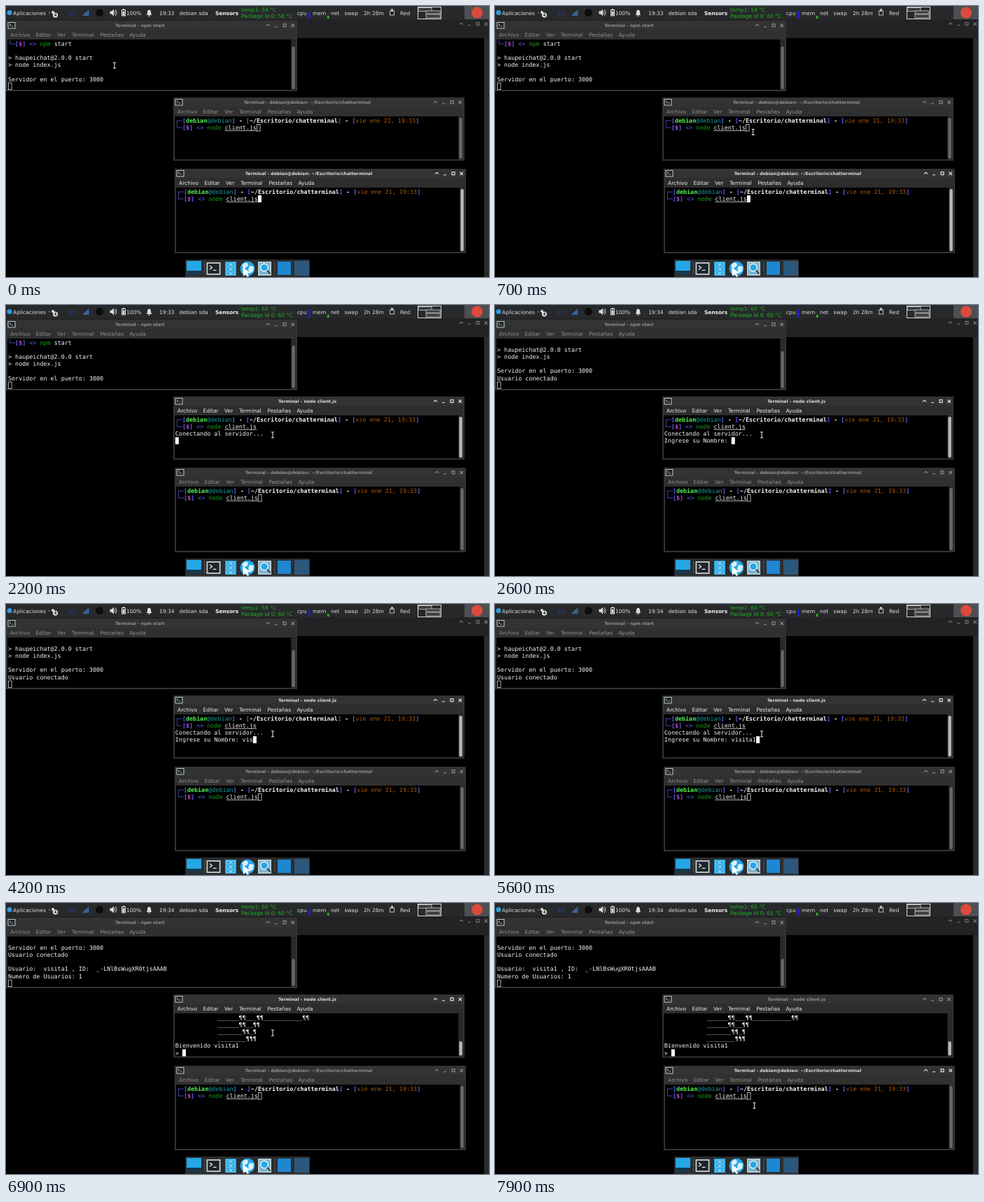
An HTML page with a canvas that plays this animation: 690 px wide and 388 px high, repeating every 8 s.

```html
<!DOCTYPE html>
<html lang="es">
<head>
<meta charset="utf-8">
<title>Chat en terminal</title>
<style>
  html, body { margin: 0; width: 100%; height: 100%; overflow: hidden; background: #000; }
  canvas { display: block; }
</style>
</head>
<body>
<canvas id="stage" width="690" height="388"></canvas>
<script>
const ctx = document.getElementById('stage').getContext('2d');
ctx.textRendering = 'geometricPrecision';

const LOOP = 8000, CELL = 5.05, LINE = 10.1;
const SANS = '"DejaVu Sans", sans-serif', MONO = '"DejaVu Sans Mono", monospace';
const USER = 'visita1';
const WHITE = '#f4f4f4', BLUE = '#6060ff', GREEN = '#18a018', DIM = '#909090';
const PANEL = '#27292b', SKY = '#24a7e6';

// ---- drawing helpers ----
function rect(x, y, w, h, color) {
  ctx.fillStyle = color;
  ctx.fillRect(x, y, w, h);
}
function frame(x, y, w, h, color, width = 1) {
  ctx.strokeStyle = color;
  ctx.lineWidth = width;
  ctx.strokeRect(x, y, w, h);
}
function disc(x, y, r, color) {
  ctx.fillStyle = color;
  ctx.beginPath();
  ctx.arc(x, y, r, 0, 7);
  ctx.fill();
}
function path(d, color, width = 1) {
  ctx.strokeStyle = color;
  ctx.lineWidth = width;
  ctx.stroke(new Path2D(d));
}
function shape(d, color) {
  ctx.fillStyle = color;
  ctx.fill(new Path2D(d));
}
function text(str, x, y, color, size = 7.5, weight = '', align = 'left') {
  ctx.font = `${weight} ${size}px ${SANS}`;
  ctx.textAlign = align;
  ctx.fillStyle = color;
  ctx.fillText(str, x, y);
}

// ---- time helpers ----
// Value of the last [time, value] step already reached.
const step = (t, steps) => steps.filter(s => s[0] <= t).pop()[1];

// Eased position along [time, x, y] keys.
function along(t, keys) {
  const i = keys.findIndex(k => k[0] > t);
  if (i < 0) return keys.at(-1).slice(1);
  if (i === 0) return keys[0].slice(1);
  const [t0, x0, y0] = keys[i - 1], [t1, x1, y1] = keys[i];
  const p = (t - t0) / (t1 - t0), e = p * p * (3 - 2 * p);
  return [x0 + (x1 - x0) * e, y0 + (y1 - y0) * e];
}

// ---- terminal text: a line is a string or a list of [text, color, style] ----
const PROMPT = [
  ['┌─[', BLUE, 'bold'], ['debian', '#55f055', 'bold'], ['@debian', '#1f9c9c'],
  [']', BLUE, 'bold'], [' - ', WHITE, 'bold'], ['[', BLUE, 'bold'],
  ['~/Escritorio/chatterminal', WHITE, 'bold'], [']', BLUE, 'bold'], [' - ', WHITE, 'bold'],
  ['[', BLUE, 'bold'], ['vie ene 21, 19:33', '#a6560f'], [']', BLUE, 'bold']
];
const command = (name, arg, style) => [
  ['└─[', BLUE, 'bold'], ['$', '#c545c5', 'bold'], [']', BLUE, 'bold'],
  [' <> ', BLUE], [name, GREEN], [' ', WHITE], [arg, WHITE, style]
];
const RUN_CLIENT = command('node', 'client.js', 'underline');

// Draws the lines and returns the column after the last one.
function termLines(lines, x, baseline) {
  let col = 0;
  ctx.textAlign = 'left';
  lines.forEach((line, row) => {
    col = 0;
    const y = baseline + row * LINE;
    for (const [str, color, style] of typeof line === 'string' ? [[line, WHITE]] : line) {
      const left = x + col * CELL;
      ctx.font = `${style === 'bold' ? 'bold' : ''} 8.39px ${MONO}`;
      ctx.fillStyle = color;
      ctx.fillText(str, left, y);
      if (style === 'underline') rect(left, y + 1.2, str.length * CELL, .7, color);
      col += str.length;
    }
  });
  return col;
}

function terminalIcon(x, y, w, h) {
  rect(x, y, w, h, '#c9cdcf');
  rect(x + w * .09, y + h * .1, w * .82, h * .8, '#1d2529');
  path(`M${x + w * .22} ${y + h * .27}l${w * .18} ${h * .15}l${-w * .18} ${h * .15}m${w * .24} ${h * .06}h${w * .24}`, '#eee', w / 16);
}

function controls(x, y, color) {
  path(`M${x - 2.5} ${y + 1}l2.5 -2.5l2.5 2.5 M${x + 9.5} ${y + 2}h4 M${x + 33} ${y - 2}l4.5 4.5m0 -4.5l-4.5 4.5`, color, 1.1);
  frame(x + 21.5, y - 2, 4, 4, color, 1.1);
}

function windowBox({ x, y, h, title, lines, textX, titleOn, bodyOn, thumbOn, thumbTop }) {
  const w = 416;
  rect(x, y, w, h, '#333333');
  terminalIcon(x + 2.5, y + 2, 11, 9.5);
  text(title, x + w / 2 - 16.5, y + 9, titleOn ? '#dcdcdc' : DIM, 6.15, 'bold', 'center');
  controls(x + 374.5, y + 6.7, titleOn ? '#f0f0f0' : DIM);

  rect(x + 2, y + 13.5, w - 4, 13.5, bodyOn ? '#2d2d2d' : '#303030');
  const items = [['Archivo', 6], ['Editar', 42.5], ['Ver', 73], ['Terminal', 94], ['Pestañas', 134.5], ['Ayuda', 176.5]];
  for (const [label, dx] of items) text(label, x + dx, y + 23, bodyOn ? '#eeeeee' : DIM);

  rect(x + 2, y + 27, 405.5, h - 29, '#000');
  rect(x + 407.5, y + 27, 6.5, h - 29, '#292929');
  ctx.fillStyle = thumbOn ? '#b9b9b9' : '#686868';
  ctx.beginPath();
  ctx.roundRect(x + 408.4, thumbTop, 4.4, y + h - 3 - thumbTop, 2);
  ctx.fill();

  const base = y + 36;
  const cursorX = textX + termLines(lines, textX, base) * CELL;
  const cursorY = base + (lines.length - 1) * LINE - 8;
  if (bodyOn) rect(cursorX, cursorY, 5, 10, '#fff');
  else frame(cursorX + .5, cursorY + .5, 4.6, 9.5, '#d8d8d8', .8);
}

// ---- panel, dock and backdrop ----
function backdrop() {
  rect(0, 0, 690, 388, '#000');
  rect(0, 19, 690, 27, '#232325');
  controls(650.5, 25.5, '#77777c');
  rect(683, 46, 7, 342, '#2a2a2b');
}

function panel(t) {
  const ink = '#dedede', green = '#1fb51f';
  rect(0, 0, 690, 19, PANEL);
  disc(5, 9.5, 3.5, '#2a9fe0');
  text('Aplicaciones', 10, 12.5, ink);
  rect(61, 9, 1.5, 1.5, '#999');
  disc(67, 9, 2, '#ddd');
  disc(70.5, 13, 3.5, '#f2f2f2');
  text('4', 70.5, 15.3, '#222', 6, 'bold', 'center');
  text('ES', 90, 12.5, '#2b3f9c');
  for (let i = 0; i < 4; i++) rect(110 + i * 2.2, 12 - i * 2, 1.6, 2 + i * 2, '#3f78c4');
  disc(133.5, 9.5, 5.5, '#0d0d0d');
  shape('M148.5 7.5h2.5l3-3v10l-3 -3h-2.5z', ink);
  path('M155 7q2 2.5 0 5M156.3 5q3.5 4.5 0 9', ink, .9);
  frame(165.5, 5.5, 5, 8.5, ink);
  rect(167, 4, 2, 1.5, ink);
  rect(166.5, 7.5, 3, 6, ink);
  text('100%', 172, 12.5, ink);
  shape('M200.5 13q1.5-1 1.5-4q0-3.5 2.5-3.5t2.5 3.5q0 3 1.5 4zM203.5 13.5h2v1.5h-2z', ink);
  text(step(t, [[0, '19:33'], [2400, '19:34']]), 219, 12.5, ink);
  text('debian sda', 247.5, 12.5, ink);
  text('Sensors', 299, 12.5, '#f2f2f2', 7.4, 'bold');
  const core = step(t, [[0, 58], [500, 59], [1700, 60], [3200, 59], [4700, 60]]);
  const pack = step(t, [[0, 58], [500, 60], [7500, 61]]);
  text(`temp1: ${core} °C`, 336, 8, green);
  text(`Package id 0: ${pack} °C`, 336, 17, green);

  text('cpu', 416, 12.5, ink);
  const load = step(t, [[0, 9], [500, 11], [1200, 12], [1700, 10], [2200, 12], [3200, 10], [6600, 9], [7100, 10], [7500, 11]]);
  rect(432, 18 - load, 2.5, load, '#2222d8');
  text('mem', 438, 12.5, ink);
  rect(459, 14, 2.5, 4, '#22c322');
  text('net', 464, 12.5, ink);
  text('swap', 483.5, 12.5, ink);
  text('2h 28m', 511, 12.5, ink);
  frame(548.5, 7, 6, 6, '#bbb');
  shape('M550 4h3v4h-3z', '#bbb');
  text('Red', 563, 12.5, ink);

  frame(588.5, 1.5, 33, 17, '#d8d8d8');
  for (const [x, y, w, h] of [[589, 2.5, 19, 5], [600, 7, 20, 4], [600, 12, 20, 5]]) {
    rect(x, y, w, h, '#3a3c3e');
    frame(x, y, w, h, '#ddd', .7);
  }
  rect(655, 0, 35, 19, '#4d4f52');
  disc(673, 9.5, 8, '#dd4a3c');
}

function dock() {
  rect(256, 363, 178, 25, '#2b2d2f');
  rect(258, 365, 21, 20, SKY);
  rect(258, 379, 21, 6, '#17384a');
  for (const x of [283, 383.5]) for (let y = 367; y < 385; y += 3) rect(x, y, 1, 1.5, '#777');
  terminalIcon(286.5, 367, 20, 18);
  rect(313, 366, 16, 20, SKY);
  for (const y of [368, 374.5, 381]) {
    frame(315, y, 12, 4, '#8fd6f5', .8);
    rect(319, y + 1.5, 4, 1, '#fff');
  }
  disc(345, 376, 10.5, SKY);
  shape('M337 371l5-4l4 2l-1 4l-5 3zM348 372l6 1l-1 7l-5 3l-2-6z', '#d9f1fb');
  shape('M338 374l1 13l3-3l3 4l2-1l-2-4l4-1z', '#fff');
  rect(360, 366, 19, 20, '#c4d3da');
  rect(361.5, 367.5, 16, 17, '#7db4d0');
  disc(369, 374.5, 6, '#eef4f6');
  disc(369, 374.5, 4.6, SKY);
  path('M373 378.5l4.5 5', '#36454d', 2);
  rect(388, 366, 19, 19, '#1f86d2');
  rect(412, 365, 21, 21, '#2c587c');
}

function pointer(t) {
  const [x, y] = along(t, [
    [100, 155, 85], [800, 381, 186], [7000, 381, 186],
    [7300, 386, 304], [7400, 386, 304], [7800, 370.5, 290]
  ]);
  const beam = `M${x - 2} ${y - 4}h4m-2 0v8m-2 0h4`;
  path(beam, '#000', 2.4);
  path(beam, '#f2f2f2', 1);
}

// ---- terminal contents ----
function serverLines(t) {
  const log = [
    command('npm', 'start'), '', '> haupeichat@2.0.0 start', '> node index.js', '',
    'Servidor en el puerto: 3000'
  ];
  if (t >= 2500) log.push('Usuario conectado');
  if (t >= 6100) log.push('', `Usuario:  ${USER} , ID:  _-LNlBsWugXR0tjsAAAB`, 'Numero de Usuarios: 1');
  return [...log, ''].slice(-7);
}

function clientLines(t) {
  if (t < 2200) return [PROMPT, RUN_CLIENT];
  if (t >= 6100) {
    const art = ['______¶¶___¶¶___________¶¶', '______¶¶__¶¶', '_______¶¶_¶', '________¶¶¶'];
    return [...art.map(row => ' '.repeat(12) + row), `Bienvenido ${USER}`, '> '];
  }
  const typed = [3300, 3600, 3800, 4300, 4500, 4800, 5600].filter(k => k <= t).length;
  const question = t < 2500 ? '' : 'Ingrese su Nombre: ' + USER.slice(0, typed);
  return [PROMPT, RUN_CLIENT, 'Conectando al servidor...', question];
}

function render(t) {
  const titled = step(t, [[0, 3], [800, 2], [7900, 3]]);
  const focused = step(t, [[0, 3], [900, 2]]);
  const lit = step(t, [[0, 3], [1000, 2]]);
  const state = n => ({ titleOn: titled === n, bodyOn: focused === n, thumbOn: lit === n });
  const shell = 'Terminal - debian@debian: ~/Escritorio/chatterminal';

  backdrop();
  panel(t);
  windowBox({
    x: 0, y: 21, h: 101, textX: 3, title: 'Terminal - npm start', lines: serverLines(t),
    thumbTop: step(t, [[0, 58], [2500, 66], [6100, 80]]), ...state(1)
  });
  windowBox({
    x: 239, y: 131, h: 90.5, textX: 241.8, title: t < 2200 ? shell : 'Terminal - node client.js',
    lines: clientLines(t), thumbTop: t < 6100 ? 160 : 198, ...state(2)
  });
  windowBox({
    x: 241, y: 233, h: 121, textX: 243.8, title: shell, lines: [PROMPT, RUN_CLIENT],
    thumbTop: 262, ...state(3)
  });
  dock();
  pointer(t);
}

const start = performance.now();
function tick() {
  render((performance.now() - start) % LOOP);
  requestAnimationFrame(tick);
}
tick();
</script>
</body>
</html>
```
